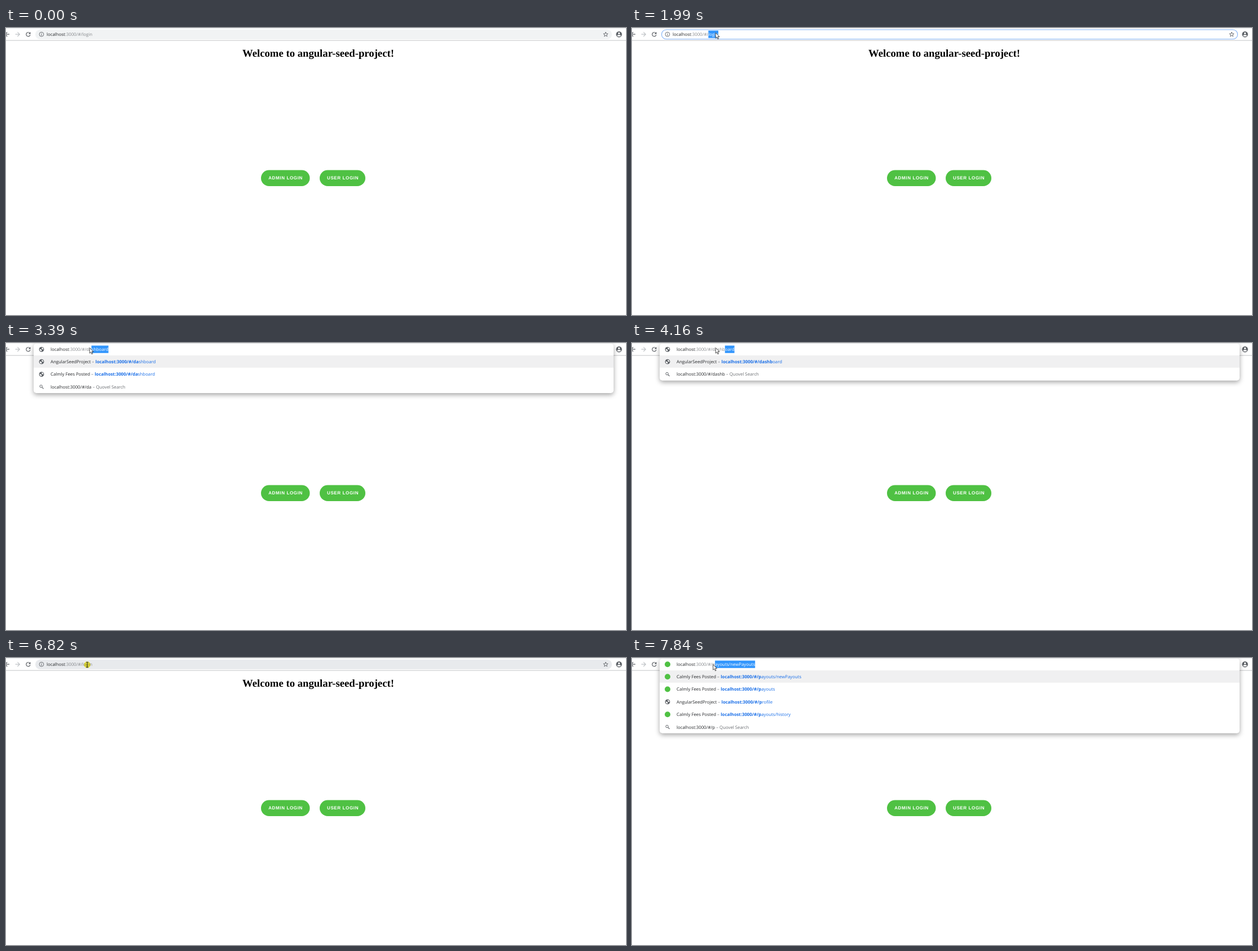
Write an HTML page with a canvas that moves like this. It is 1099 px wide and 510 px high and loops after 7990 ms.

```html
<!DOCTYPE html>
<html lang="en">
<head>
<meta charset="utf-8">
<title>Login page</title>
<style>
html, body { margin: 0; width: 100%; height: 100%; overflow: hidden; background: #fff; }
canvas { display: block; width: 1099px; height: 510px; }
</style>
</head>
<body>
<canvas id="stage" width="1099" height="510"></canvas>
<script>
const ctx = document.getElementById('stage').getContext('2d');
const LOOP = 7990;
const ROW = 22.35;
const BASE = 'localhost:3000/#/';
const SEED = 'AngularSeedProject';
const FEES = 'Calmly Fees Posted';
const DARK = '#26282b', GREY = '#878a8e', ICON = '#5f6368', LINK = '#1a6fe8';
const SELECT = '#3296fd', GREEN = '#4fc143';
const UI = '7.8px "Open Sans", sans-serif';

// What has been typed after the base address; null means the list is closed.
const TYPING = [
  [0, null], [2460, ''], [3310, 'd'], [3390, 'da'], [3770, 'das'], [3930, 'dash'],
  [4160, 'dashb'], [4390, 'dashbo'], [4470, 'dashboa'], [4550, 'dashboar'],
  [4870, 'dashboard'], [5190, null], [7760, 'p']
];

// State of the closed address bar.
const BAR = [
  [0, 'idle'], [800, 'hover'], [1370, 'all'], [1530, 'word'],
  [5190, 'idle'], [6350, 'hover'], [6900, 'all'], [7060, 'word']
];

const POINTER = [
  [0, 'none'], [90, 'arrow halo'], [800, 'beam halo'], [1760, 'none'],
  [1990, 'arrow'], [6350, 'beam halo'], [7140, 'arrow']
];

const PATH = [
  [90, 1058, 472], [250, 800, 330], [410, 450, 170], [570, 170, 60], [720, 81, 24],
  [880, 129, 16], [960, 131, 10], [1210, 136, 14], [1600, 137, 14], [1680, 148, 8],
  [6350, 148, 8], [6500, 150, 6], [6660, 146, 17], [6820, 144, 12], [7140, 143.5, 11]
];

function stateAt(list, t) {
  return list.filter(([start]) => start <= t).pop()[1];
}

function pointAt(t) {
  const i = PATH.findIndex(([time]) => time > t);
  if (i < 1) return PATH[i < 0 ? PATH.length - 1 : 0].slice(1);
  const [t0, x0, y0] = PATH[i - 1], [t1, x1, y1] = PATH[i];
  const k = (t - t0) / (t1 - t0);
  return [x0 + (x1 - x0) * k, y0 + (y1 - y0) * k];
}

function text(str, x, y, color, font = UI) {
  ctx.font = font;
  ctx.fillStyle = color;
  ctx.fillText(str, x, y);
  return x + ctx.measureText(str).width;
}

function pill(x, y, w, h, r, color) {
  ctx.beginPath();
  ctx.roundRect(x, y, w, h, r);
  ctx.fillStyle = color;
  ctx.fill();
}

function disc(x, y, r, color) {
  ctx.beginPath();
  ctx.arc(x, y, r, 0, Math.PI * 2);
  ctx.fillStyle = color;
  ctx.fill();
}

function polygon(points, x = 0, y = 0) {
  ctx.beginPath();
  points.forEach(([px, py]) => ctx.lineTo(x + px, y + py));
  ctx.closePath();
}

function stroke(d, color = ICON, width = 1.2) {
  ctx.strokeStyle = color;
  ctx.lineWidth = width;
  ctx.stroke(new Path2D(d));
}

const icons = {
  site(x, y) { disc(x, y, 5, GREEN); },
  globe(x, y) {
    disc(x, y, 4.4, ICON);
    ctx.fillStyle = '#fff';
    polygon([[-3.4, -0.6], [-1, 0], [0.6, 1.4], [-0.6, 3.5], [-2.6, 2.2]], x, y);
    ctx.fill();
    polygon([[0.8, -3.4], [2.6, -2.2], [3.5, 0.2], [1.6, 0], [0, -1.6]], x, y);
    ctx.fill();
  },
  search(x, y) {
    ctx.beginPath();
    ctx.arc(x - 0.9, y - 1, 2.2, 0, Math.PI * 2);
    ctx.strokeStyle = ICON;
    ctx.lineWidth = 1;
    ctx.stroke();
    stroke(`M${x + 0.8} ${y + 0.7}l2.7 2.7`, ICON, 1.2);
  },
  info(x, y) {
    ctx.beginPath();
    ctx.arc(x, y, 3.9, 0, Math.PI * 2);
    ctx.strokeStyle = ICON;
    ctx.lineWidth = 0.9;
    ctx.stroke();
    ctx.fillStyle = ICON;
    ctx.fillRect(x - 0.5, y - 2.2, 1, 1);
    ctx.fillRect(x - 0.5, y - 0.5, 1, 2.8);
  },
  star(x, y) {
    const tips = Array.from({ length: 10 }, (_, i) => {
      const a = i * Math.PI / 5 - Math.PI / 2, r = i % 2 ? 1.8 : 4.3;
      return [Math.cos(a) * r, Math.sin(a) * r];
    });
    polygon(tips, x, y + 0.3);
    ctx.strokeStyle = ICON;
    ctx.lineWidth = 0.9;
    ctx.stroke();
  },
  account(x, y) {
    disc(x, y, 5.2, ICON);
    disc(x, y - 1.8, 1.6, '#fff');
    ctx.beginPath();
    ctx.ellipse(x, y + 2.4, 3.1, 1.5, 0, 0, Math.PI * 2);
    ctx.fill();
  }
};

function drawPage() {
  ctx.fillStyle = '#fff';
  ctx.fillRect(0, 0, 1099, 510);
  ctx.textAlign = 'center';
  text('Welcome to angular-seed-project!', 553.5, 51, '#000', 'bold 18.7px "Liberation Serif", serif');
  ctx.textAlign = 'left';
  const label = 'bold 8px "Liberation Sans", sans-serif';
  pill(452, 252.5, 86.5, 28.5, 14.2, GREEN);
  pill(556, 252.5, 81, 28.5, 14.2, GREEN);
  ctx.letterSpacing = '0.63px';
  text('ADMIN LOGIN', 465.2, 269.4, '#fff', label);
  text('USER LOGIN', 569, 269.4, '#fff', label);
  ctx.letterSpacing = '0px';
}

function drawToolbar() {
  ctx.fillStyle = '#e6e7e9';
  ctx.fillRect(0, 0, 1099, 0.7);
  ctx.fillStyle = '#c2c3c5';
  ctx.fillRect(0, 21.6, 1099, 1);
  stroke('M6 11.2H-1.5M2.2 7.4L-1.6 11.2L2.2 15');
  stroke('M16.5 11.2H24M20.4 7.4L24.2 11.2L20.4 15', '#bfc2c6');
  stroke('M42.3 9.2A3.6 3.6 0 1 0 42.9 12.2');
  ctx.fillStyle = ICON;
  polygon([[43.5, 7], [43.5, 10.8], [39.7, 10.8]]);
  ctx.fill();
  icons.account(1086.6, 11.2);
}

function drawUrl(x, path, selectFrom) {
  const url = BASE + path;
  const host = BASE.indexOf(':');
  const middle = Math.max(host, selectFrom);
  if (selectFrom > 0) {
    x = text(url.slice(0, host), x, 14.2, DARK);
    x = text(url.slice(host, middle), x, 14.2, GREY);
  }
  const chosen = url.slice(selectFrom);
  if (chosen) {
    ctx.font = UI;
    ctx.fillStyle = SELECT;
    ctx.fillRect(x, 4.6, ctx.measureText(chosen).width, 13.2);
    text(chosen, x, 14.2, '#fff');
  }
  return x;
}

function drawBar(mode) {
  const focused = mode === 'all' || mode === 'word';
  pill(52, 2.8, 1022, 17.2, 8.6, focused ? '#fff' : mode === 'hover' ? '#e8eaed' : '#f1f3f4');
  if (focused) {
    ctx.beginPath();
    ctx.roundRect(52.5, 3, 1021, 16.8, 8.4);
    ctx.strokeStyle = '#7fb0f5';
    ctx.lineWidth = 1.1;
    ctx.stroke();
  }
  icons.info(62.9, 11.2);
  icons.star(1063, 11.2);
  const from = { all: 0, word: BASE.length }[mode] ?? BASE.length + 5;
  drawUrl(72, 'login', from);
}

function suggestions(typed) {
  if (typed === '') return [
    ['site', SEED, ''], ['globe', SEED, 'login'], ['globe', SEED, 'dashboard'],
    ['site', FEES, 'businessentity/organization'], ['globe', FEES, 'user']
  ];
  if (typed === 'p') return [
    ['site', FEES, 'payouts/newPayouts'], ['site', FEES, 'payouts'],
    ['globe', SEED, 'profile'], ['site', FEES, 'payouts/history']
  ];
  const rows = [['globe', SEED, 'dashboard'], ['globe', FEES, 'dashboard']];
  return rows.slice(0, typed.length < 3 ? 2 : 1);
}

function drawList(typed, t) {
  const rows = suggestions(typed);
  const height = 21 + (rows.length + 1) * ROW;
  ctx.save();
  ctx.shadowColor = 'rgba(0,0,0,0.36)';
  ctx.shadowBlur = 8;
  ctx.shadowOffsetY = 3;
  pill(49, 1, 1028, height, 5, '#fff');
  ctx.restore();
  ctx.fillStyle = '#f0f0f1';
  ctx.fillRect(49, 22, 1028, 21.8);

  const [firstIcon, , firstPath] = rows[0];
  icons[firstIcon](63, 11.3);
  const end = drawUrl(79, firstPath, BASE.length + typed.length);
  const caret = typed === firstPath && !(typed === '' && t >= 3000);
  if (caret) {
    ctx.fillStyle = '#000';
    ctx.fillRect(Math.round(end - 0.5), 5, 1, 11);
  }

  rows.forEach(([icon, title, path], i) => {
    const y = 33.2 + i * ROW;
    icons[icon](63, y);
    let x = text(title, 79, y + 2.9, DARK);
    x = text(' – ', x, y + 2.9, ICON) + 0.3;
    x = text(BASE + typed, x, y + 2.9, LINK, 'bold ' + UI);
    text(path.slice(typed.length), x, y + 2.9, LINK);
  });
  const y = 33.2 + rows.length * ROW;
  icons.search(63, y);
  const x = text(BASE + typed, 79, y + 2.9, DARK);
  text(' – Quovel Search', x, y + 2.9, '#6b6e72');
}

function drawPointer(t) {
  const look = stateAt(POINTER, t);
  const [x, y] = pointAt(t);
  if (look.includes('halo')) {
    ctx.globalCompositeOperation = 'multiply';
    disc(x, y, 5.8, '#fbf245');
    ctx.globalCompositeOperation = 'source-over';
  }
  if (look.includes('beam')) {
    stroke(`M${x - 2} ${y - 4.6}h4M${x} ${y - 4.6}v9.2M${x - 2} ${y + 4.6}h4`, '#222', 0.9);
  }
  if (look.includes('arrow')) {
    polygon([[0, 0], [0, 9.8], [2.2, 7.7], [3.8, 11.4], [5.4, 10.7], [3.8, 7.1], [6.8, 7.1]], x + 0.2, y + 0.4);
    ctx.fillStyle = '#fff';
    ctx.fill();
    ctx.strokeStyle = '#222';
    ctx.lineWidth = 0.8;
    ctx.stroke();
  }
}

function draw(t) {
  const typed = stateAt(TYPING, t);
  drawPage();
  drawToolbar();
  if (typed === null) drawBar(stateAt(BAR, t));
  else drawList(typed, t);
  drawPointer(t);
}

ctx.textRendering = 'geometricPrecision';
const start = performance.now();
function tick() {
  draw((performance.now() - start) % LOOP);
  requestAnimationFrame(tick);
}
tick();
</script>
</body>
</html>
```
